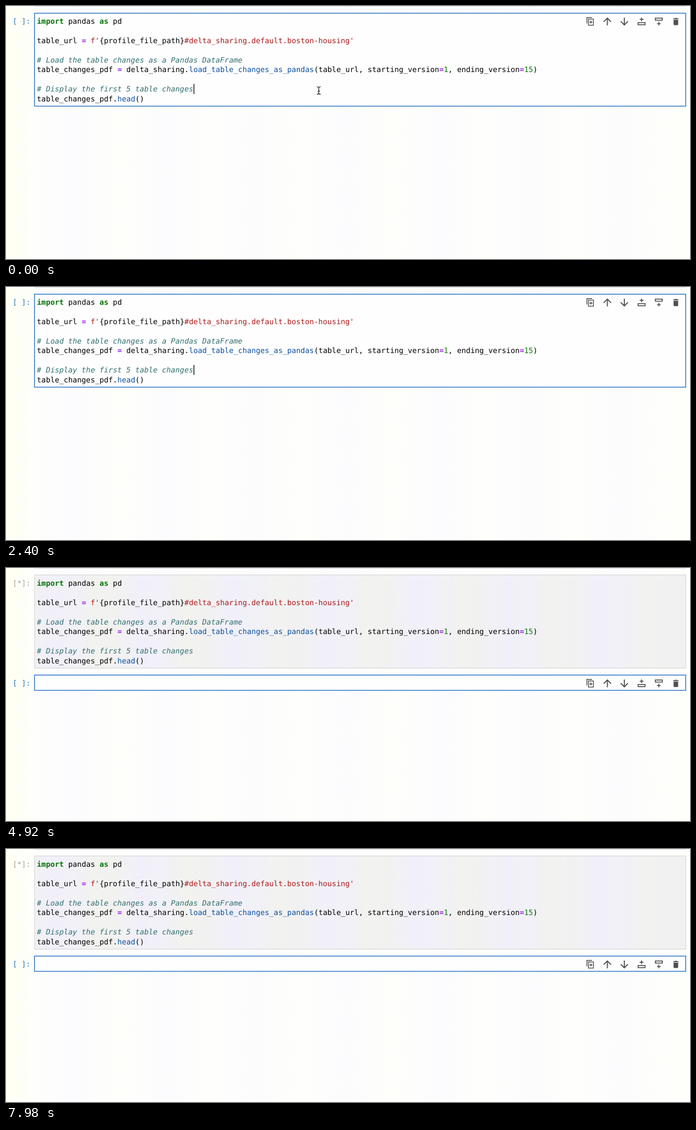
These frames come from a looping animation (1229x456 px, 8 s). An HTML page with a canvas:

```html
<!DOCTYPE html>
<html lang="en">
<head>
<meta charset="utf-8">
<title>Notebook cell run</title>
<style>
  html, body { margin: 0; width: 100%; height: 100%; overflow: hidden; background: #fdfdfd; }
  canvas { display: block; }
</style>
</head>
<body>
<canvas id="stage" width="1229" height="456"></canvas>
<script>
const ctx = document.getElementById('stage').getContext('2d');
const LOOP = 8000, RUN_AT = 2500, CELL_STEP = 180;
const CHAR = 8.031, LINE = 17.5, LEFT = 55.6, BASE = 31.5;

const STYLES = {
  plain: ['', '#000'],
  keyword: ['bold', '#007400'],
  operator: ['bold', '#a020f0'],
  string: ['', '#ac1a1a'],
  comment: ['italic', '#326f70'],
  number: ['', '#008000'],
  call: ['', '#0b4fa0'],
  active: ['', '#2f7ab5'],
  busy: ['', '#a3a39c']
};

// Each line: row, then style and text in turn.
const CODE = [
  [0, 'keyword', 'import', 'plain', ' pandas ', 'keyword', 'as', 'plain', ' pd'],
  [2, 'plain', 'table_url ', 'operator', '=', 'string', " f'", 'plain', '{profile_file_path}',
    'string', "#delta_sharing.default.boston-housing'"],
  [4, 'comment', '# Load the table changes as a Pandas DataFrame'],
  [5, 'plain', 'table_changes_pdf ', 'operator', '=', 'plain', ' delta_sharing.',
    'call', 'load_table_changes_as_pandas', 'plain', '(table_url, starting_version',
    'operator', '=', 'number', '1', 'plain', ', ending_version',
    'operator', '=', 'number', '15', 'plain', ')'],
  [7, 'comment', '# Display the first 5 table changes'],
  [8, 'plain', 'table_changes_pdf.', 'call', 'head', 'plain', '()']
];

function text(style, str, x, y) {
  const [face, color] = STYLES[style];
  ctx.font = `${face} 13.34px "DejaVu Sans Mono", monospace`;
  ctx.textRendering = 'geometricPrecision';
  ctx.fillStyle = color;
  ctx.fillText(str, x, y);
}

function drawCode() {
  for (const [row, ...parts] of CODE) {
    let column = 0;
    for (let i = 0; i < parts.length; i += 2) {
      text(parts[i], parts[i + 1], LEFT + column * CHAR, BASE + row * LINE);
      column += parts[i + 1].length;
    }
  }
}

function stroke(path, color, width) {
  ctx.strokeStyle = color;
  ctx.lineWidth = width;
  ctx.stroke(new Path2D(path));
}

function box(x, y, w, h, color, width) {
  ctx.strokeStyle = color;
  ctx.lineWidth = width;
  ctx.strokeRect(x, y, w, h);
}

// Soft alternating tint with a regular horizontal rhythm.
function tint(low, high, phase) {
  const g = ctx.createLinearGradient(0, 0, 1229, 0);
  for (let x = 0; x <= 1229; x += 41) {
    const k = 0.5 + 0.5 * Math.cos((x - phase) / 164 * 2 * Math.PI);
    const mix = low.map((v, i) => v + (high[i] - v) * k);
    g.addColorStop(x / 1229, `rgb(${mix})`);
  }
  return g;
}
const pageTint = tint([252, 252, 254], [254, 254, 251], 30);
const cellTint = tint([242, 242, 239], [241, 240, 250], 92);
const edgeTint = ctx.createLinearGradient(0, 0, 50, 0);
edgeTint.addColorStop(0, 'rgba(255,255,244,1)');
edgeTint.addColorStop(1, 'rgba(255,255,244,0)');

function drawToolbar() {
  const ink = '#4f4f4f';
  stroke('M1043.7 31.5V20.8H1053 M1051 26.2V31.8 M1048.2 29H1053.8', ink, 1.4);
  box(1046.5, 23.6, 9, 11, ink, 1.4);
  stroke('M1080.5 35V22 M1074 28.3L1080.5 21.8L1087 28.3', ink, 1.8);
  stroke('M1111 21V34 M1104.5 27.7L1111 34.2L1117.5 27.7', ink, 1.8);
  stroke('M1142 20.8V27.4 M1138.7 24.1H1145.3', ink, 1.6);
  box(1135.7, 30, 12.6, 3.8, ink, 1.6);
  box(1166.7, 21.8, 12.6, 3.8, ink, 1.6);
  stroke('M1173 28.4V35 M1169.7 31.7H1176.3', ink, 1.6);
  ctx.fillStyle = ink;
  ctx.fill(new Path2D('M1198.8 22.2H1201.3L1202 21.4H1205.2L1205.9 22.2H1208.4V23.7H1198.8Z' +
    'M1199.5 24.8H1207.7V33Q1207.7 34.5 1206.2 34.5H1201Q1199.5 34.5 1199.5 33Z'));
}

function drawActiveCell(top, height) {
  ctx.save();
  ctx.translate(0, top);
  text('active', '[ ]:', 12, BASE);
  ctx.fillStyle = '#fefefe';
  ctx.fillRect(51.3, 13, 1170, height);
  box(51.3, 13, 1170, height, '#3478c8', 1.5);
  drawToolbar();
  ctx.restore();
}

function drawPointer() {
  const beam = 'M558.5 145.5Q562 145.5 562 148Q562 145.5 565.5 145.5' +
    'M562 148V157 M558.5 159.2Q562 159.2 562 156.7Q562 159.2 565.5 159.2 M560 153.5H564';
  stroke(beam, '#fff', 3);
  stroke(beam, '#111', 1.2);
}

function drawCaret(x, y) {
  ctx.fillStyle = '#000';
  ctx.fillRect(x, y, 1.3, 18);
}

function draw(t) {
  ctx.fillStyle = pageTint;
  ctx.fillRect(0, 0, 1229, 456);
  ctx.fillStyle = edgeTint;
  ctx.fillRect(0, 0, 50, 456);
  ctx.fillStyle = '#dddae0';
  ctx.fillRect(51, 0, 1171, 1);

  if (t < RUN_AT) {
    drawActiveCell(0, 167.5);
    drawCode();
    if (t < 640 || t >= 1820) drawCaret(337, 140.5);
    if (t < 2200) drawPointer();
    return;
  }

  text('busy', '[*]:', 12, BASE);
  ctx.fillStyle = cellTint;
  ctx.fillRect(51, 12, 1171, 169);
  box(51.5, 12.5, 1170, 168, '#d2d2d4', 1);
  drawCode();
  drawActiveCell(CELL_STEP, 27.5);
  if (t < 4450 || (t >= 5630 && t < 6810)) drawCaret(56, 198);

  ctx.globalAlpha = Math.max(0, Math.min(1, (4700 - t) / 200));
  ctx.fillStyle = '#7c7c7c';
  ctx.fillRect(1227.7, 258, 1.3, 153.5);
  ctx.globalAlpha = 1;
}

function tick() {
  draw(performance.now() % LOOP);
  requestAnimationFrame(tick);
}
tick();
</script>
</body>
</html>
```
